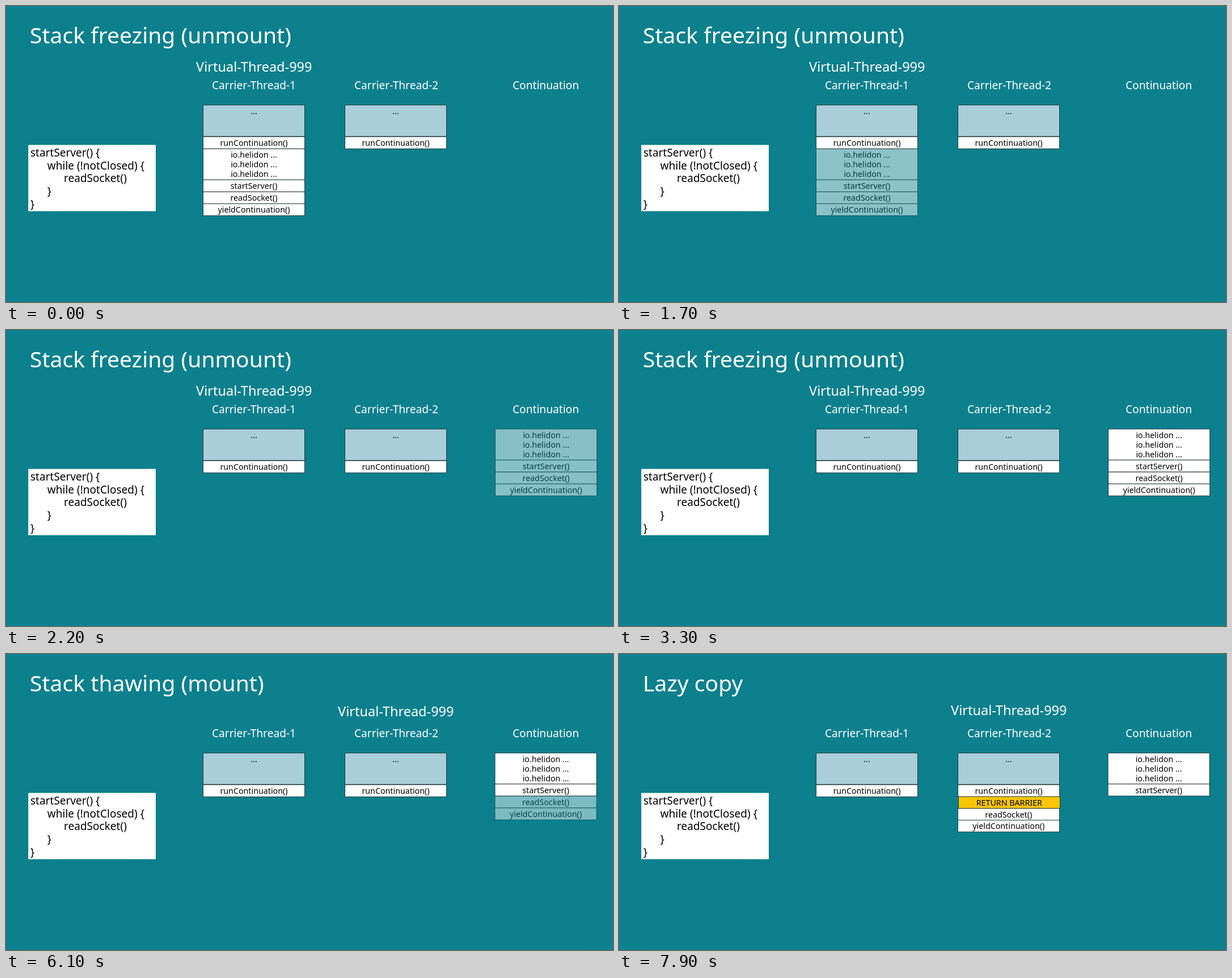
Write an HTML page that moves like this. It is 1070 by 523 pixels and loops after 8 s.

```html
<!DOCTYPE html>
<html lang="en">
<head>
<meta charset="utf-8">
<title>Stack freezing and thawing</title>
<style>
  html, body { margin: 0; width: 100%; height: 100%; overflow: hidden; background: #0c808d; }
  svg { display: block; font-family: "Noto Sans", "Open Sans", sans-serif; }
  text { white-space: pre; }
  .title { font-size: 39.1px; fill: #fff; }
  .thread { font-size: 23.5px; fill: #fff; text-anchor: middle; }
  .label { font-size: 19.15px; fill: #fff; text-anchor: middle; }
  .code { font-size: 19.05px; }
  .row text { font-size: 14.25px; text-anchor: middle; }
  .row rect { stroke: #101c1f; stroke-width: .8; }
</style>
</head>
<body>
<svg id="stage" width="1070" height="523" viewBox="0 0 1070 523"></svg>
<script>
const LOOP = 8000;
const stage = document.getElementById('stage');

function add(parent, tag, attrs = {}, content = '') {
  const el = document.createElementNS('http://www.w3.org/2000/svg', tag);
  for (const key in attrs) el.setAttribute(key, attrs[key]);
  el.textContent = content;
  return parent.appendChild(el);
}
const group = (parent = stage) => add(parent, 'g');
const text = (cls, x, y, content) => add(stage, 'text', { class: cls, x, y }, content);

// One stack entry; several lines of text make it taller
function row(parent, x, y, height, lines, fill = '#fff') {
  const g = add(parent, 'g', { class: 'row' });
  add(g, 'rect', { x, y, width: 179, height, fill });
  lines.forEach((line, i) =>
    add(g, 'text', { x: x + 89.5, y: y + 15.7 + 16.9 * i }, line));
}

const io = Array(3).fill('io.helidon ...');
function callers(parent, x, y) {
  row(parent, x, y, 54.8, io);
  row(parent, x, y + 54.8, 21.1, ['startServer()']);
}
function callees(parent, x, y, step = 21) {
  row(parent, x, y, step, ['readSocket()']);
  row(parent, x, y + step, step, ['yieldContinuation()']);
}

const titles = ['Stack freezing (unmount)', 'Stack thawing (mount)', 'Lazy copy']
  .map(t => text('title', 42, 65.6, t));
const threads = [[437.3, 115.7], [687.3, 109.7], [687.3, 107.7]]
  .map(([x, y]) => text('thread', x, y, 'Virtual-Thread-999'));

text('label', 437, 147, 'Carrier-Thread-1');
text('label', 688, 147, 'Carrier-Thread-2');
text('label', 951.5, 147, 'Continuation');

add(stage, 'rect', { x: 39.3, y: 245.5, width: 224.7, height: 117, fill: '#fff' });
[[43, 'startServer() {'], [72.8, 'while (!notClosed) {'], [102, 'readSocket()'], [72.8, '}'], [43, '}']]
  .forEach(([x, line], i) => text('code', x, 266 + 22.7 * i, line));

for (const x of [347.5, 597.5]) {
  row(stage, x, 175, 55.3, ['...'], '#a9ced9');
  row(stage, x, 231, 21.2, ['runContinuation()']);
}

const running = group();
callers(running, 347.5, 252.3);
callees(running, 347.5, 328.3);

const saved = group();
const savedTop = group(saved), savedEnd = group(saved);
callers(savedTop, 862.5, 175);
callees(savedEnd, 862.5, 251);

const resumed = group();
callees(resumed, 597.3, 272.8, 20.7);
row(resumed, 598.3, 252, 20.8, ['RETURN BARRIER'], '#f9c504');

const ramp = (t, from, to) => Math.min(1, Math.max(0, (t - from) / (to - from)));
const show = (el, alpha) => el.setAttribute('opacity', alpha);

function draw(t) {
  const slide = ramp(t, 3530, 3930);
  const lazy = t >= 7900 ? 1 : 0;
  const alphas = [1 - slide, slide * (1 - lazy), lazy];
  alphas.forEach((a, i) => {
    show(titles[i], a);
    show(threads[i], a);
  });

  show(running, 1 - ramp(t, 1365, 2065));
  show(saved, ramp(t, 1850, 2550));
  saved.setAttribute('transform', `translate(${-0.5 * slide} 0)`);
  show(savedEnd, 1 - ramp(t, 5725, 6425));
  show(resumed, ramp(t, 6235, 6935));
}

const start = performance.now();
function tick() {
  draw((performance.now() - start) % LOOP);
  requestAnimationFrame(tick);
}
tick();
</script>
</body>
</html>
```
